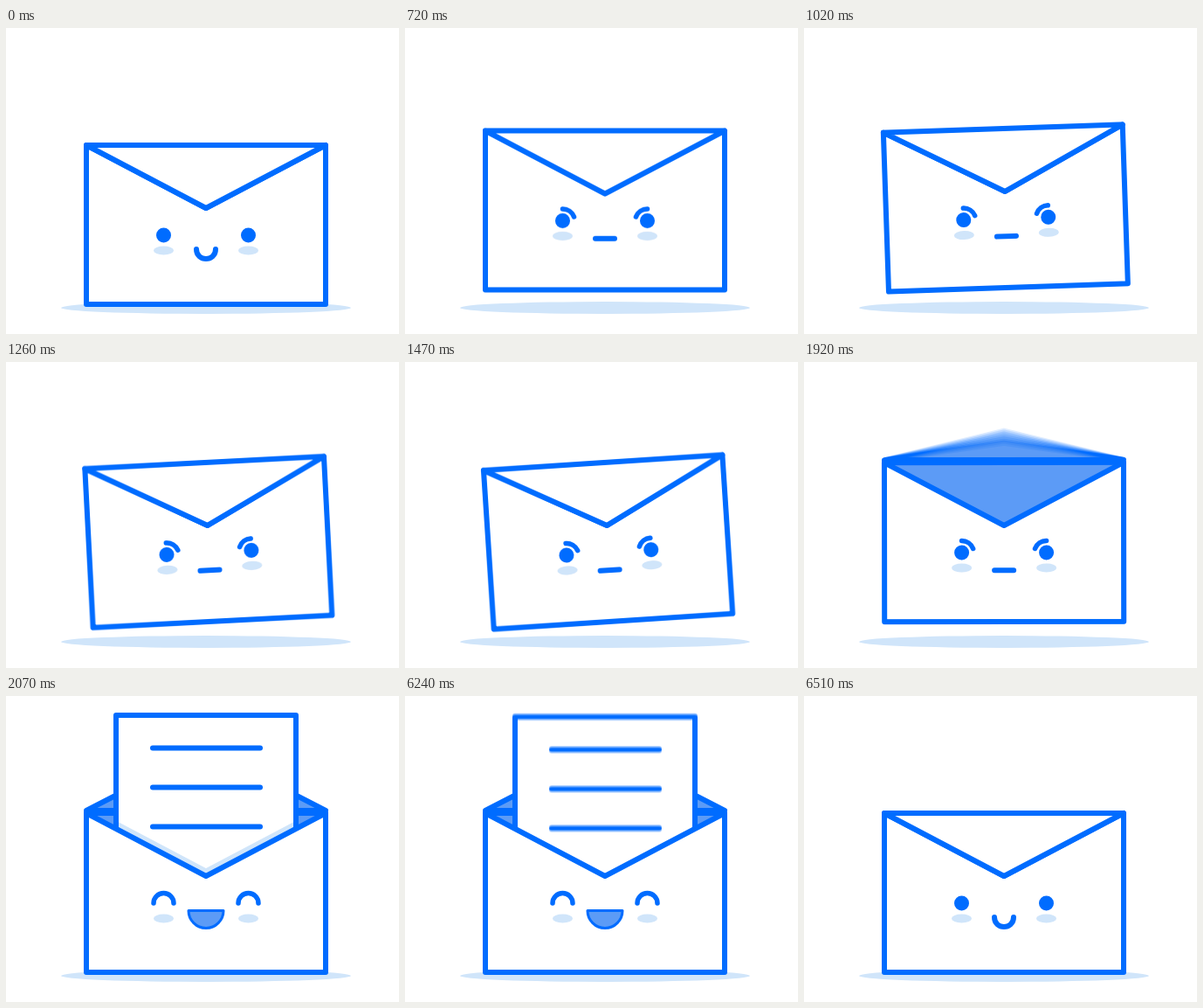
Write an HTML page with a canvas that moves like this. It is 450 px wide and 350 px high and loops after 7.17 s.

```html
<!DOCTYPE html>
<html lang="en">
<head>
<meta charset="utf-8">
<title>Envelope</title>
<style>
html, body { margin: 0; height: 100%; overflow: hidden; background: #fff; }
canvas { display: block; }
</style>
</head>
<body>
<canvas id="stage" width="450" height="350"></canvas>
<script>
const LOOP = 7170, STEP = 30, SHUTTER = 12, SAMPLES = 8;
const BLUE = '#006cff', MID = '#5c9bf6', PALE = '#d0e5fa', WHITE = '#fff';
const L = 92, R = 366, T = 134, B = 316, CX = 229, TIP = 206;
const PIVOT = 170, EYES = [180.5, 277.5];

const stage = document.getElementById('stage').getContext('2d');
const buffer = document.createElement('canvas');
buffer.width = 450;
buffer.height = 350;
const c = buffer.getContext('2d');

// Linear interpolation through [time, value] pairs
function keys(t, ...points) {
  if (t <= points[0][0]) return points[0][1];
  for (let i = 1; i < points.length; i++) {
    const [t0, v0] = points[i - 1], [t1, v1] = points[i];
    if (t < t1) return v0 + (v1 - v0) * (t - t0) / (t1 - t0);
  }
  return points[points.length - 1][1];
}

const smooth = p => p * p * (3 - 2 * p);
const ramp = (t, from, to) => smooth(keys(t, [from, 0], [to, 1]));

function paint(fill, stroke, width = 6) {
  if (fill) { c.fillStyle = fill; c.fill(); }
  if (stroke) { c.strokeStyle = stroke; c.lineWidth = width; c.stroke(); }
}

function poly(points, fill, stroke, width, closed) {
  c.beginPath();
  for (const [x, y] of points) c.lineTo(x, y);
  if (closed) c.closePath();
  paint(fill, stroke, width);
}

function ellipse(x, y, rx, ry, fill) {
  c.beginPath();
  c.ellipse(x, y, rx, ry, 0, 0, 7);
  paint(fill);
}

function arc(x, y, r, from, to, width) {
  c.beginPath();
  c.arc(x, y, r, from, to);
  paint(null, BLUE, width);
}

function shake(t) {
  const size = Math.min(4.2, Math.max(0, 0.0076 * (t - 770))) * (1 - ramp(t, 1800, 1940));
  return -size * Math.cos(2 * Math.PI * (t - 1026) / 216.5) * Math.PI / 180;
}

function letterDrop(t) {
  if (t < 2070) return keys(t, [1950, 190], [1980, 90], [2010, -10], [2040, -4], [2070, 0]);
  return 190 * keys(t, [6234, 0], [6354, 1]) ** 2;
}

function letter(t) {
  const drop = letterDrop(t), top = 22 + drop;
  c.save();
  c.beginPath();
  c.rect(0, -50, 450, 350);
  c.clip();
  c.beginPath();
  c.rect(126, top, 206, 300 - top);
  paint(WHITE);
  if (t < 6240) {
    c.save();
    c.clip();
    poly([[L, T], [CX, TIP], [R, T]], null, PALE, 16);
    c.restore();
  }
  c.beginPath();
  c.rect(126, top, 206, 300 - top);
  paint(null, BLUE);
  for (const y of [59.5, 104.5, 149.5]) poly([[168, y + drop], [291, y + drop]], null, BLUE);
  c.restore();
}

function envelope(t) {
  const open = ramp(t, 1830, 1980) * (1 - ramp(t, 6360, 6500));
  const apex = TIP - 145.5 * open;
  const mouth = [[L, T], [CX, TIP], [R, T]];
  if (open > 0) {
    if (apex < T) poly([[L, 131], [CX, apex], [R, 131]], MID, BLUE, 6, true);
    poly(mouth, MID);
    poly([[L, T], [R, T]], null, BLUE);
    if (t > 1950 && t < 6360) letter(t);
  }
  poly([...mouth, [R, B], [L, B]], WHITE, BLUE, 6, true);
  if (apex > T) poly([[L, T], [CX, apex], [R, T]], WHITE, BLUE, 6, true);
}

function face(t) {
  const happy = t >= 1965 && t < 6390;
  const angry = t < 1965 ? ramp(t, 540, 720) : 0;
  for (const x of EYES) {
    ellipse(x, 254.5, 11.5, 5, PALE);
    if (happy) arc(x, 237, 11.5, Math.PI, 0, 5.5);
    else ellipse(x, 237, 8.5, 8.5, BLUE);
  }
  if (happy) {
    c.beginPath();
    c.arc(CX, 245.5, 20, 0, Math.PI);
    c.closePath();
    paint(MID, BLUE, 3);
    return;
  }
  if (angry > 0) {
    const span = 1.2 * angry, up = -Math.PI / 2;
    arc(EYES[0], 237.5, 14, up, up + span, 5.5);
    arc(EYES[1], 237.5, 14, up - span, up, 5.5);
  }
  // The smile flattens into a straight line
  const y = 253 + 4.3 * angry, bend = 14.7 * (1 - angry);
  c.beginPath();
  c.moveTo(CX - 11, y);
  c.bezierCurveTo(CX - 11, y + bend, CX + 11, y + bend, CX + 11, y);
  paint(null, BLUE);
}

function scene(t) {
  c.setTransform(1, 0, 0, 1, 0, 0);
  c.lineCap = c.lineJoin = 'round';
  c.fillStyle = WHITE;
  c.fillRect(0, 0, 450, 350);
  ellipse(CX, 320, 166, 7, PALE);
  const lift = 19 * ramp(t, 540, 780) * (1 - ramp(t, 1950, 1995));
  c.translate(CX, PIVOT - lift);
  c.rotate(shake(t));
  c.translate(-CX, -PIVOT);
  envelope(t);
  face(t);
}

function frame(now) {
  const t = Math.floor((now % LOOP) / STEP) * STEP;
  const moving = (t >= 540 && t < 2070) || (t >= 6240 && t < 6510);
  const count = moving ? SAMPLES : 1;
  // Average several moments for motion blur
  for (let i = 0; i < count; i++) {
    scene(t + SHUTTER * i / SAMPLES);
    stage.globalAlpha = 1 / (i + 1);
    stage.drawImage(buffer, 0, 0);
  }
  requestAnimationFrame(() => frame(performance.now() - start));
}

const start = performance.now();
frame(0);
</script>
</body>
</html>
```
